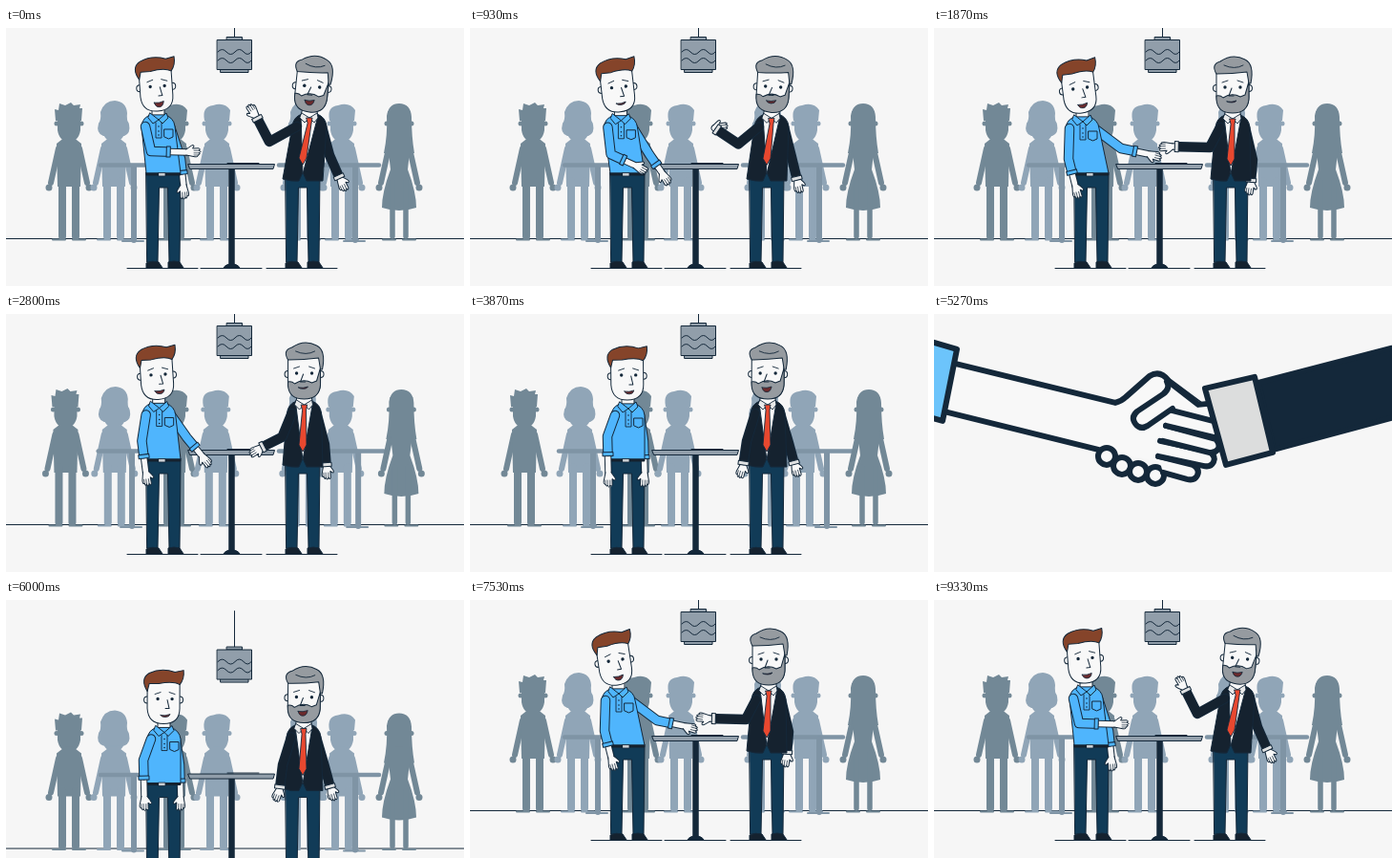
Recreate the animation shown at these times as an HTML page with a canvas. Size 480 by 270 pixels, loop 9.39 s.

```html
<!DOCTYPE html>
<html lang="en">
<head>
<meta charset="utf-8">
<title>Handshake</title>
<style>
html, body { margin: 0; height: 100%; overflow: hidden; background: #f6f6f6; }
canvas { display: block; width: 480px; height: 270px; }
</style>
</head>
<body>
<canvas id="stage"></canvas>
<script>
const LOOP = 9390;
const INK = '#14283a', SKIN = '#f8f8f8', SHIRT = '#4fb5fd', JEANS = '#113b57', SUIT = '#15222f';
const BROWN = '#85442a', GREY = '#969ba0', TIE = '#e8482f', METAL = '#919eaa';
const FAR = '#728896', PALE = '#90a5b7', MID = '#7f94a5';

const canvas = document.getElementById('stage');
const ctx = canvas.getContext('2d');
const dpr = window.devicePixelRatio || 1;
canvas.width = 480 * dpr;
canvas.height = 270 * dpr;

const clamp = v => Math.min(1, Math.max(0, v));
const span = (t, from, to) => clamp((t - from) / (to - from));
const smooth = u => u * u * (3 - 2 * u);
const mix = (a, b, u) => a.map((v, i) => v + (b[i] - v) * u);

function shape(d, fill, width = 1, color = INK) {
  const path = new Path2D(d);
  if (fill) { ctx.fillStyle = fill; ctx.fill(path); }
  if (width) { ctx.lineWidth = width; ctx.strokeStyle = color; ctx.stroke(path); }
}
const line = (d, width = 1, color = INK) => shape(d, null, width, color);
const disc = (x, y, r, fill, width = 0) =>
  shape(`M${x - r} ${y}a${r} ${r} 0 1 1 ${2 * r} 0a${r} ${r} 0 1 1 ${-2 * r} 0Z`, fill, width);

function at(x, y, degrees, draw) {
  ctx.save();
  ctx.translate(x, y);
  ctx.rotate(degrees * Math.PI / 180);
  draw();
  ctx.restore();
}

// A limb is a thick dark line with a thinner coloured one on top.
function limb(points, width, fill) {
  const d = 'M' + points.map(p => p.join(' ')).join('L');
  line(d, width + 2);
  line(d, width, fill);
}

/* ---------- background ---------- */

const HAIR = {
  spiky: 'M-14 97L-15 85L-11 86L-10 79L-4 81L2 78L5 81L12 80L11 84L14 84L13 97Z',
  curly: 'M-11 113Q-19 110 -16 100Q-13 96 -14 88Q-10 76 1 76Q13 77 14 89Q13 96 16 101Q18 110 11 113Z',
  neat: 'M-13 97Q-16 82 -4 81Q8 77 14 86L13 97Z',
  long: 'M-16 131Q-12 112 -13 92Q-11 79 0 79Q12 79 13 93Q13 114 16 131Z'
};

function bystander(x, color, hair, dress) {
  at(x, 0, 0, () => {
    shape('M-12 87H12V107Q10 119 0 119Q-10 119 -12 107Z', color, 0);
    disc(-13, 100, 2.500, color);
    disc(13, 100, 2.500, color);
    shape(HAIR[hair], color, 0);
    line('M-11 126L-19 162M11 126L19 162', 6, color);
    disc(-21, 167, 3.500, color);
    disc(21, 167, 3.500, color);
    if (dress) {
      shape('M-4 114H4L12 122L9 148Q18 172 18 188Q0 194 -18 188Q-18 172 -9 148L-12 122Z', color, 0);
    } else {
      shape('M-4 114H4L13 121L12 166H-12L-13 121Z', color, 0);
    }
    line('M-7 160V218M7 160V218', dress ? 5.500 : 8, color);
    line('M-17 221.500H-4M4 221.500H17', 2, color);
  });
}

function farTable(left, right, leg) {
  line(`M${left} 143.500H${right}`, 4.500, MID);
  line(`M${leg} 145V222`, 6, MID);
  line(`M${leg - 12} 223H${leg + 10}`, 2, MID);
}

// The people in the back drift apart while the camera moves on.
function background(drift) {
  line('M0 220.500H480');
  bystander(66 - 9 * drift, FAR, 'spiky');
  bystander(113 + 2 * drift, PALE, 'curly');
  farTable(99 - 6 * drift, 176, 134 - 5 * drift);
  bystander(176, FAR, 'neat');
  bystander(221 - 3 * drift, PALE, 'neat');
  bystander(312 - 3 * drift, PALE, 'curly');
  bystander(352 - 3 * drift, PALE, 'neat');
  farTable(286, 391 + 12 * drift, 366 + 8 * drift);
  bystander(412 + 6 * drift, FAR, 'long', true);

  line('M239.500 -28V10');
  shape('M231.500 9.500H247.500V12.500H231.500Z', METAL);
  shape('M225 43H254V46.500H225Z', METAL);
  shape('M221.500 12.500H257.500V43.500H221.500Z', METAL);
  for (const y of [25, 34])
    line(`M222 ${y}q4.500 -5 9 0t9 0t9 0t8 0`);
}

function table() {
  line('M236.500 148V248', 6.500);
  shape('M228 251Q230 247 236.500 247Q243 247 245 251Z', INK);
  line('M204 251.500H268');
  shape('M191 142.500H281.500L280 147.500H193Z', METAL);
  line('M232 141.500H265');
}

/* ---------- the two men ---------- */

function hand(x, y, angle, flip) {
  at(x, y, angle, () => {
    ctx.scale(1, flip);
    shape('M-1 -3L3 -6Q7 -9 7 -6L5.500 -4L12 -4.200Q15 -3 12 -1.800' +
      'Q16 -.6 12 .8Q15 2 11 3Q12 5 8 4.800L-1 3', SKIN);
    line('M12 -1.800H7M12 .8H7M11 3H7', .7);
  });
}

function arm(shoulder, [ex, ey, wx, wy, angle], flip, suit) {
  const part = suit ? .8 : .4;
  const cuff = [ex + (wx - ex) * part, ey + (wy - ey) * part];
  const wrist = [wx, wy];
  limb([[ex, ey], wrist], 5.500, SKIN);
  hand(wx, wy, angle, flip);
  limb([shoulder, [ex, ey], cuff], 8.500, suit ? SUIT : SHIRT);
  const turn = Math.atan2(wy - ey, wx - ex) * 180 / Math.PI;
  at(...cuff, turn, () => shape('M1 -5.500H5V5.500H1Z', suit ? '#dfe1e2' : SHIRT));
}

function legs(x) {
  shape(`M${x - 18} 151H${x + 18}L${x + 17} 245H${x + 6}L${x + 4.500} 167H${x - 4.500}L${x - 6} 245H${x - 17}Z`, JEANS);
  shape(`M${x - 18} 251V246Q${x - 12} 243 ${x - 5} 245L${x - 1} 251Z`, SUIT);
  shape(`M${x + 5} 251V245Q${x + 11} 243 ${x + 17} 245L${x + 21} 251Z`, SUIT);
  line(`M${x - 38} 251.500H${x + 36}`);
}

function mouth(x, y, open) {
  const h = 1 + 4 * open;
  shape(`M${x - 5} ${y}Q${x} ${y + 1} ${x + 5} ${y - 1}Q${x + 4} ${y + h} ${x} ${y + h}` +
    `Q${x - 4} ${y + h} ${x - 5} ${y}Z`, '#6b2a2c', .8);
}

function face(eyes, blink) {
  disc(-17, -25, 3.500, SKIN, 1);
  disc(17, -25, 3.500, SKIN, 1);
  shape('M-17 -44V-16Q-16 0 0 0Q17 0 17 -16V-44Z', SKIN);
  eyes.forEach((x, i) => {
    if (blink) line(`M${x - 2} -26H${x + 2}`);
    else disc(x, -26, 1.700, INK);
    line(i ? `M${x - 3} -33L${x + 3} -31` : `M${x - 3} -31L${x + 3} -33`, .9);
  });
}

function youngMan([x, y, tilt, ...arms], talk, blink) {
  legs(165);
  arm([x + 13, y + 16], arms.slice(5), -1);
  shape(`M${x - 6} ${y - 5}V${y + 6}H${x + 7}V${y - 5}Z`, SKIN);
  shape(`M${x - 7} ${y + 4}Q${x - 16} ${y + 6} ${x - 17} ${y + 16}L147 152H183` +
    `L${x + 18} ${y + 16}Q${x + 17} ${y + 7} ${x + 8} ${y + 4}Z`, SHIRT);
  shape(`M${x - 8} ${y + 2}L${x + 1} ${y + 9}L${x + 9} ${y + 2}L${x + 11} ${y + 7}` +
    `L${x + 5} ${y + 13}L${x + 1} ${y + 9}L${x - 5} ${y + 13}L${x - 10} ${y + 7}Z`, SHIRT);
  line(`M${x - 2} ${y + 12}V${y + 28}H${x + 4}V${y + 12}`, .9);
  for (const d of [16, 21, 25]) disc(x + 1, y + d, .8, INK);
  shape(`M${x + 7} ${y + 19}H${x + 16}V${y + 27}L${x + 11.500} ${y + 29}L${x + 7} ${y + 27}Z`, SHIRT);
  line('M148 153H182', 3, SUIT);
  shape('M160 151.500H167V155H160Z', '#c9ced2', .8);
  at(x, y, tilt, () => {
    face([-6, 9], blink);
    line('M4 -25L6 -16H2');
    mouth(2, -9, talk);
    shape('M-17 -34Q-25 -47 -15 -53Q-2 -59 12 -54L21 -56Q22 -47 17 -41Q10 -45 -5 -42L-15 -42Z', BROWN);
  });
  arm([x - 13, y + 16], arms.slice(0, 5), 1);
}

function elder([x, y, tilt, ...arms], talk, blink) {
  legs(311);
  arm([x + 13, y + 16], arms.slice(5), 1, true);
  shape(`M${x - 8} ${y + 3}Q${x - 17} ${y + 6} ${x - 18} ${y + 16}L290 158Q300 161 307 160` +
    `L311 151L315 160H332L${x + 18} ${y + 16}Q${x + 17} ${y + 6} ${x + 8} ${y + 3}Z`, SUIT);
  shape(`M${x - 7} ${y - 4}L${x - 9} ${y + 5}L311 153L${x + 9} ${y + 5}L${x + 7} ${y - 4}Z`, SKIN);
  shape(`M${x - 8} ${y + 2}L${x} ${y + 7}L${x + 8} ${y + 2}L${x + 9} ${y + 7}` +
    `L${x + 5} ${y + 12}L${x} ${y + 7}L${x - 5} ${y + 12}L${x - 10} ${y + 7}Z`, '#e9eaea', .9);
  shape(`M${x - 3} ${y + 7}H${x + 3}L${x + 2} ${y + 13}L315 ${y + 49}L311 ${y + 56}` +
    `L307 ${y + 49}L${x - 2} ${y + 13}Z`, TIE, .9);
  at(x, y, tilt, () => {
    face([-8, 8], blink);
    shape('M-17 -17Q-13 -18 -10 -15Q-1 -21 8 -16L13 -18L17 -32V-14Q16 1 0 1Q-16 1 -17 -13Z', GREY);
    line('M-1 -25L-4 -17H1');
    mouth(-1, -11, talk);
    shape('M-17 -40Q-23 -50 -13 -53Q0 -62 13 -55Q23 -50 19 -30L17 -30L15 -42Q0 -40 -17 -40Z', GREY);
    line('M-9 -49Q2 -44 11 -49', .9);
  });
  arm([x - 13, y + 16], arms.slice(0, 5), 1, true);
}

// Chin x, y, head tilt, then elbow, wrist and hand angle of each arm.
const POSES = {
  talk: [
    [159, 87, -4, 152, 129, 190, 130, 0, 183, 137, 186, 165, 85],
    [318, 87, 6, 276, 119, 262, 92, -122, 339, 133, 350, 158, 65]
  ],
  reach: [
    [155, 89, -8, 141, 137, 148, 165, 75, 196, 126, 225, 132, 15],
    [313, 88, 0, 289, 125, 250, 124, 182, 334, 138, 332, 161, 100]
  ],
  rest: [
    [165, 90, 0, 144, 128, 145, 167, 90, 182, 133, 183, 167, 92],
    [312, 88, 0, 290, 133, 286, 158, 105, 334, 135, 340, 157, 75]
  ]
};
const CHANGES = [[750, 'reach'], [2600, 'rest'], [6550, 'reach'], [8200, 'talk']];

function poseAt(t, who) {
  let pose = POSES.talk[who];
  for (const [start, name] of CHANGES)
    pose = mix(pose, POSES[name][who], smooth(span(t, start, start + 420)));
  return pose;
}

function scene(t) {
  const wave = n => Math.sin(n * 2 * Math.PI * t / LOOP);
  const chat = n => .55 + .4 * Math.cos(n * 2 * Math.PI * t / LOOP);
  const young = poseAt(t, 0), old = poseAt(t, 1);
  young[2] += wave(7);
  old[2] += wave(5);
  old[5] -= wave(12);
  old[7] += 7 * wave(-12);
  const quiet = smooth(span(t, 750, 1150)) - smooth(span(t, 2600, 3000)) +
    smooth(span(t, 6550, 6950)) - smooth(span(t, 8200, 8600));
  background(t < 5000 ? smooth(span(t, 2000, 3870)) : 0);
  table();
  youngMan(young, chat(26), (t + 700) % 3130 < 110);
  elder(old, chat(22) * (1 - quiet), (t + 1500) % 3130 < 110);
}

/* ---------- close-up ---------- */

function sparks(t) {
  const u = span(t, 4230, 4570);
  if (u <= 0 || u >= 1) return;
  const light = '#6fc3f6', deep = '#1b78b3';
  const rays = [
    [-34, -80, 12, light], [0, -82, 8, light], [34, -80, 12, deep], [-56, -55, 5, deep],
    [-34, 80, 12, light], [0, 82, 8, deep], [34, 80, 12, light], [-67, 49, 5, light], [62, 51, 2, deep]
  ];
  const reach = .55 + .45 * Math.sqrt(2 * u);
  for (const [x, y, size, color] of rays) {
    const tilt = Math.atan2(y, x);
    const len = size * Math.min(1, 2 * (1 - u)) / 2;
    const cx = 244 + x * reach, cy = 134 + y * reach;
    const dx = Math.cos(tilt) * len, dy = Math.sin(tilt) * len;
    line(`M${cx - dx} ${cy - dy}L${cx + dx} ${cy + dy}`, 2.4, color);
  }
}

function leftHand() {
  shape('M-200 0L22 56L190 97L226 69Q237 62 246 74L281 100L270 165L172 146L14 107L-200 54Z', SKIN, 0);
  line('M22 56L190 97Q197 95 201 91L226 69Q237 62 246 74L281 100M14 107L172 146', 6);
  shape('M-200 -25L24 41L9 116L-200 56Z', '#6cc4fb', 6);
  for (const [x, y] of [[181, 153], [197, 163], [214, 169], [232, 173]]) disc(x, y, 9, SKIN, 6);
}

function rightHand() {
  shape('M248 76L284 100L300 125L280 170L236 160L215 112Z', SKIN, 0);
  shape('M235 153L271 162Q279 166 276 173Q273 179 265 177L240 170', SKIN, 6);
  shape('M237 137L288 148Q296 153 293 159Q290 165 282 163L235 153', SKIN, 6);
  shape('M243 121L295 135Q300 140 298 145Q295 150 288 149L240 137', SKIN, 6);
  shape('M249 105L296 117Q304 121 302 127Q300 133 293 133L243 121', SKIN, 6);
  shape('M244 75Q248 82 240 88L213 106Q206 112 211 119Q216 126 224 121L250 103', SKIN, 6);
  line('M246 75L277 99L287 98', 6);
  shape('M340 76L700 -17V54L356 146Z', INK, 6);
  shape('M284 82L336 70L355 149L306 162Z', '#dcdddd', 6);
}

function closeUp(t) {
  const apart = (1 - span(t, 4000, 4270)) ** 3 + span(t, 5460, 5760) ** 3;
  const shake = 5 * Math.sin((t - 4400) / 170) * span(t, 4300, 4420) * (1 - span(t, 5250, 5460));
  sparks(t);
  at(-330 * apart, shake, 0, leftHand);
  at(330 * apart, shake, 0, rightHand);
}

function frame(now) {
  const t = now % LOOP;
  const drop = span(t, 3880, 4150) ** 3 + (1 - span(t, 5700, 6313)) ** 3 - 1;
  ctx.setTransform(dpr, 0, 0, dpr, 0, 0);
  ctx.lineCap = ctx.lineJoin = 'round';
  ctx.fillStyle = '#f6f6f6';
  ctx.fillRect(0, 0, 480, 270);
  if (drop < 1) at(0, 300 * drop, 0, () => scene(t));
  if (t > 4000 && t < 5760) closeUp(t);
  requestAnimationFrame(frame);
}
requestAnimationFrame(frame);
</script>
</body>
</html>
```
